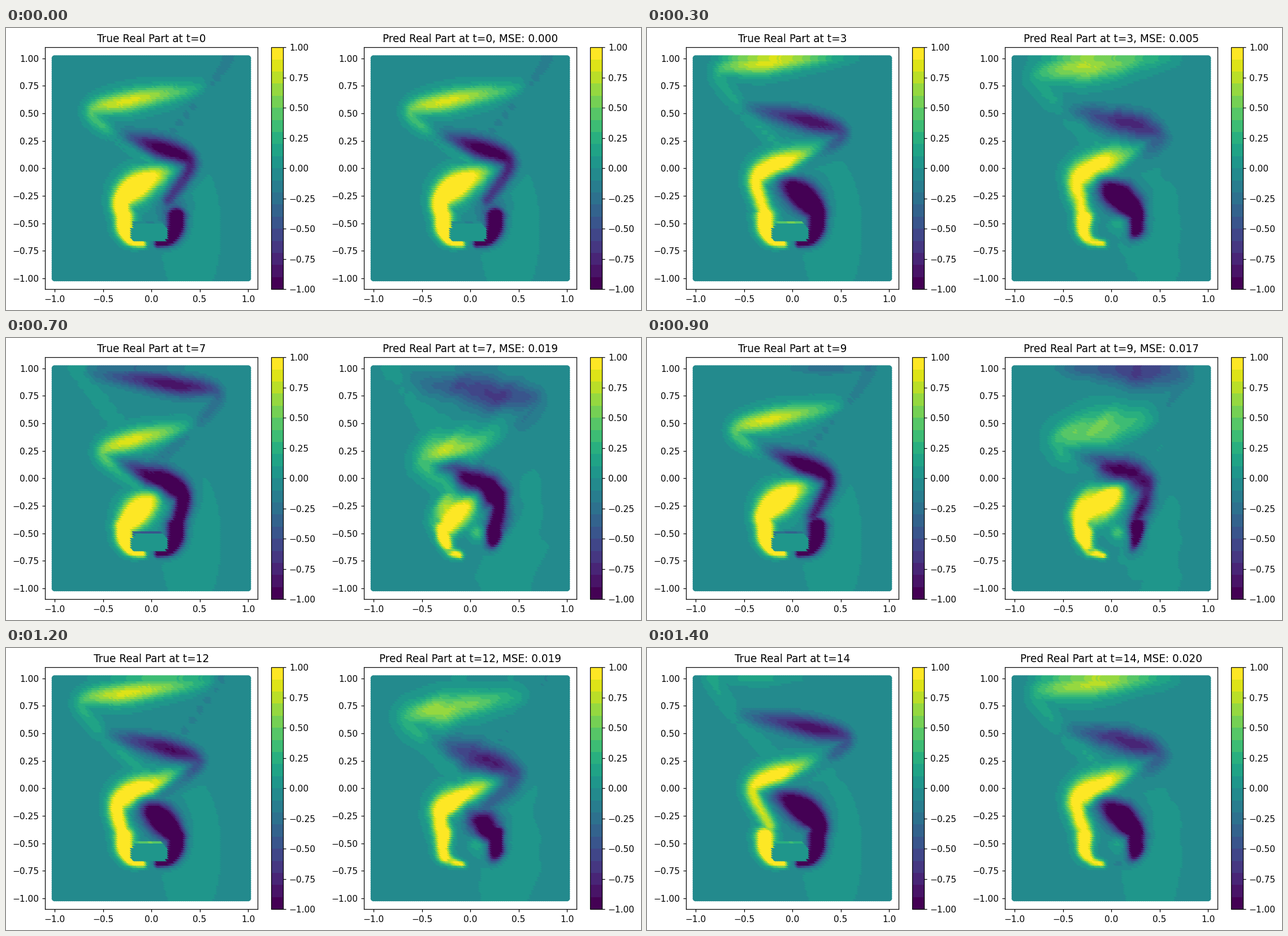
Animation of 1123x499 px, one loop 1500 ms. Source, as a matplotlib script:

```python
import numpy as np
import matplotlib.pyplot as plt
from matplotlib.animation import FuncAnimation

W, H, DPI = 1123, 499, 111.2
FRAMES, INTERVAL = 15, 100
PERIOD = 9.75      # shedding period in time steps
ASPECT = 1.14      # vertical over horizontal pixels per unit
GRID = 100

gx, gy = (g.ravel() for g in np.meshgrid(np.linspace(-1, 1, GRID),
                                         np.linspace(-1, 1, GRID)))
rng = np.random.default_rng(4)
waves = [(*rng.normal(0, 11, 2), rng.uniform(0, 2 * np.pi)) for _ in range(14)]


def noise(x, y, shift):
    return sum(np.sin(a * x + b * y + c + shift) for a, b, c in waves) / 2.6


def ramp(v):
    v = np.clip(v, 0, 1)
    return v * v * (3 - 2 * v)


def bump(x, y, cx, cy, rx, ry):
    return np.exp(-((x - cx) / rx) ** 2 - ((y - cy) / ry) ** 2)


def spline(points, n=48):
    """Catmull-Rom curve through the rows of points."""
    p = np.vstack([2 * points[0] - points[1], points,
                   2 * points[-1] - points[-2]])
    u = np.linspace(0, len(points) - 1, n)
    i = np.minimum(u.astype(int), len(points) - 2)
    f = (u - i)[:, None]
    a, b, c, d = p[i], p[i + 1], p[i + 2], p[i + 3]
    return b + f / 2 * (c - a + f * (2 * a - 5 * b + 4 * c - d
                                     + f * (3 * (b - c) + d - a)))


def ribbon(x, y, knots):
    """Soft band along a curve; each knot is x, y, strength, width."""
    px, py, a, w = spline(np.array(knots)).T
    d2 = (x[:, None] - px) ** 2 + (ASPECT * (y[:, None] - py)) ** 2
    return (np.maximum(a, 0) * np.exp(-d2 / w ** 2)).max(axis=1)


def stem(x, y, blur, foot):
    """Steady shear layer beside the body."""
    thin = 1 - .15 * blur
    return ribbon(x, y, [(-.08, -.67, 1.4 * foot, .035),
                         (-.20, -.635, 1.6 * foot, .055 * thin),
                         (-.26, -.54, 1.8, .08 * thin),
                         (-.27, -.42, 1.7, .09 * thin)])


def vortex(x, y, age, blur):
    """Hook that grows from the stem, lets go and drifts up."""
    grow = ramp((age + 6) / 3.5)
    aged = ramp((age + 1) / 9)
    loose = ramp((age - 2) / 8)
    late = 1 - .6 * ramp((age - 9) / 5)
    core_x = -.27 + grow * (.14 - .008 * age)
    core_y = -.14 + .053 * age + .0027 * age ** 2
    tip_x = core_x + .33 * grow + .04 * age * grow
    tip_y = core_y + grow * (.16 - .005 * age)
    bend_x = -.29 - .02 * age - .0012 * age ** 2
    power = grow * (1 - .32 * blur * aged)
    size = (1 - .2 * aged) * (1 + .5 * blur * aged)
    return ribbon(x, y, [
        (-.28 + .3 * loose, -.42 + .5 * loose,
         power * late * (1.6 - 1.3 * aged), .085 * size),
        (bend_x, core_y - .13, power * late * (1.7 - 1.25 * aged), .10 * size),
        (core_x, core_y, power * (1.6 - .72 * aged), .14 * size),
        (tip_x, tip_y, power * (.4 - .2 * aged), .10 * size)])


def street(x, y, t, blur=0):
    total = np.zeros_like(x)
    for sign, offset in ((1, 0), (-1, PERIOD / 2)):
        foot = 1 if sign > 0 else 1 - ramp(2 * blur)
        ages = [t + offset + k * PERIOD for k in range(-3, 2)]
        parts = [vortex(sign * x, y, a, blur) for a in ages if -6 < a < 17]
        parts.append(stem(sign * x, y, blur, foot))
        total += sign * np.max(parts, axis=0)
    return total


background = -.02 + .05 * bump(gx, gy, .42, -.55, .33, .7)


def true_field(t):
    v = street(gx, gy, t) + background
    lid = .55 * np.cos(2 * np.pi * (t - 2.75) / PERIOD)
    roof = (np.abs(gy + .475) < .02) & (np.abs(gx + .025) < .155)
    v[roof] = lid * (1 - 2 * np.abs(gx[roof]))
    body = (np.abs(gx + .01) / .185) ** 6 + (np.abs(gy + .57) / .08) ** 6 < 1
    v[body] = 0
    return v


def predicted_field(t):
    if t == 0:
        return true_field(0)
    blur = np.sin(np.pi * t / 16)
    x = gx + .016 * blur * noise(gx, gy, .7 * t)
    y = gy + .016 * blur * noise(gy, gx, 2 - .5 * t)
    v = street(x, y, .9 * t, blur)
    v *= 1 + .08 * blur * noise(1.4 * gx, 1.4 * gy, .9 * t)
    v *= 1 - bump(gx, gy, 0, -.56, .19, .1)
    v *= 1 - .6 * blur * bump(gx, gy, -.2, -.64, .05, .03)
    v += .4 * blur * bump(gx, gy, .08, -.48, .07, .06)
    return v + background + .006 * blur * noise(gx, gy, t)


def error(t):
    return np.interp(t, [0, 3, 5, 7, 9, 12, 14],
                     [0, .005, .010, .019, .017, .019, .020])


fig = plt.figure(figsize=((W + .01) / DPI, (H + .01) / DPI), dpi=DPI,
                 facecolor="white")
plt.rcParams["font.family"] = "DejaVu Sans"
cmap = plt.get_cmap("viridis", 20)


def box(left, width):
    return [left / W, (H - 462.3) / H, width / W, 428.1 / H]


def panel(left):
    ax = fig.add_axes(box(left, 376.1))
    dots = ax.scatter(gx, gy, c=np.zeros_like(gx), cmap=cmap, vmin=-1, vmax=1)
    ax.set(xlim=(-1.1, 1.1), ylim=(-1.1, 1.1),
           xticks=np.arange(-1, 1.1, .5), yticks=np.arange(-1, 1.1, .25))
    cax = fig.add_axes(box(left + 399.6, 21.4))
    fig.colorbar(dots, cax=cax, ticks=np.arange(-1, 1.1, .25))
    return dots, ax.set_title("", fontsize=12)


true_dots, true_title = panel(69)
pred_dots, pred_title = panel(633)


def update(t):
    true_dots.set_array(true_field(t))
    pred_dots.set_array(predicted_field(t))
    true_title.set_text(f"True Real Part at t={t}")
    pred_title.set_text(f"Pred Real Part at t={t}, MSE: {error(t):.3f}")
    return true_dots, pred_dots, true_title, pred_title


anim = FuncAnimation(fig, update, frames=FRAMES, interval=INTERVAL,
                     repeat=True, repeat_delay=0, blit=False)
plt.show()
```
